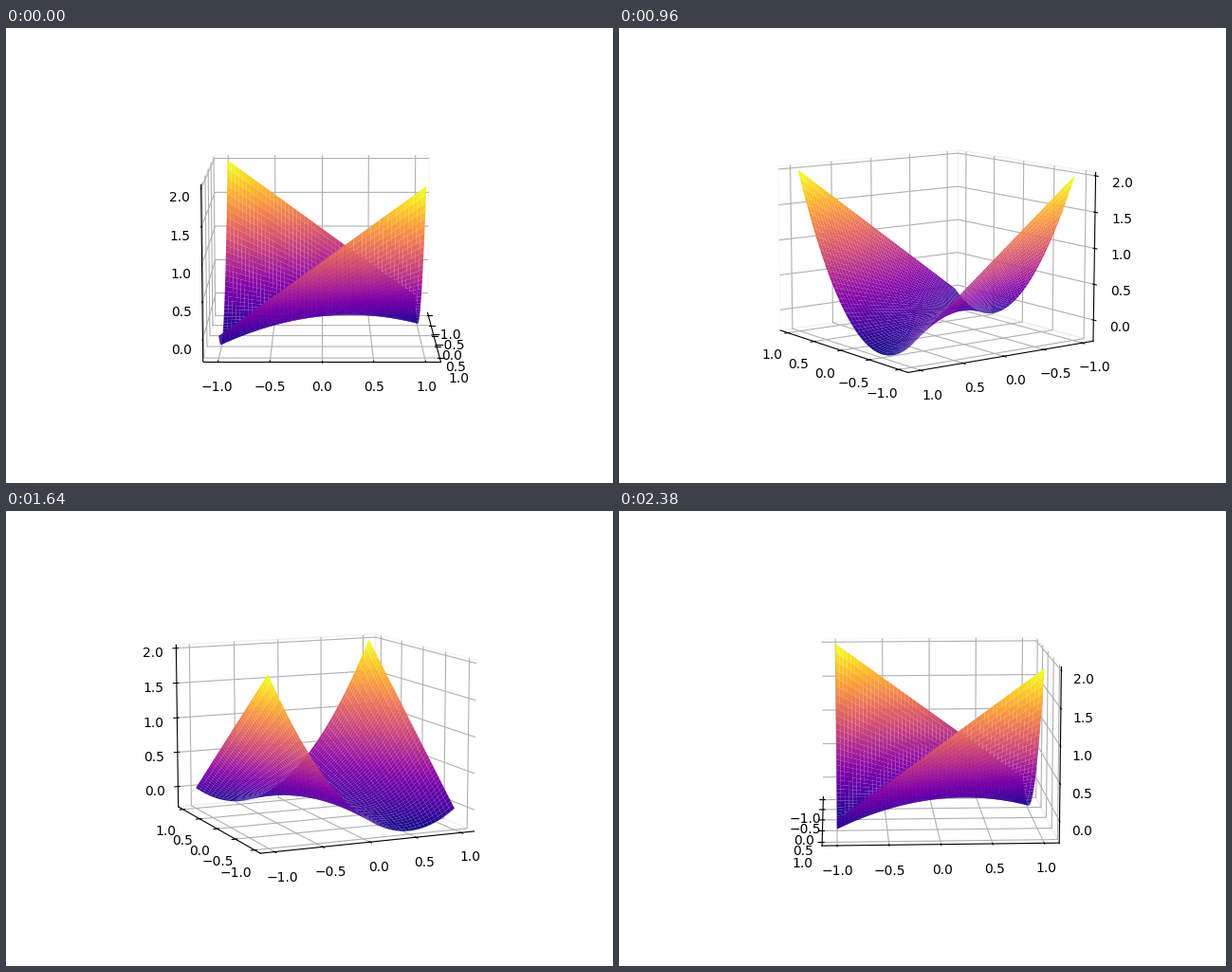
Animation, 640 px wide and 480 px high, one loop 2400 ms. Source, as a matplotlib script:

```python
import matplotlib.pyplot as plt
import numpy as np
from matplotlib.animation import FuncAnimation

FRAMES = 120
INTERVAL = 20  # ms
ELEVATION = 10

plt.rcParams["font.family"] = "DejaVu Sans"
fig = plt.figure(figsize=(6.4, 4.8), dpi=100)
ax = fig.add_subplot(projection="3d")

side = np.linspace(-1, 1, 50)
x, y = np.meshgrid(side, side)
ax.plot_surface(x, y, x**2 + x * y, cmap="plasma")

# Keep only the faint outlines of the walls and floor.
for axis in (ax.xaxis, ax.yaxis, ax.zaxis):
    axis.pane.fill = False


def turn(frame):
    ax.view_init(elev=ELEVATION, azim=frame * 360 / FRAMES)
    return ()


anim = FuncAnimation(
    fig,
    turn,
    frames=FRAMES,
    init_func=lambda: turn(0),
    interval=INTERVAL,
    repeat=True,
    repeat_delay=0,
    blit=False,
)
plt.show()
```
